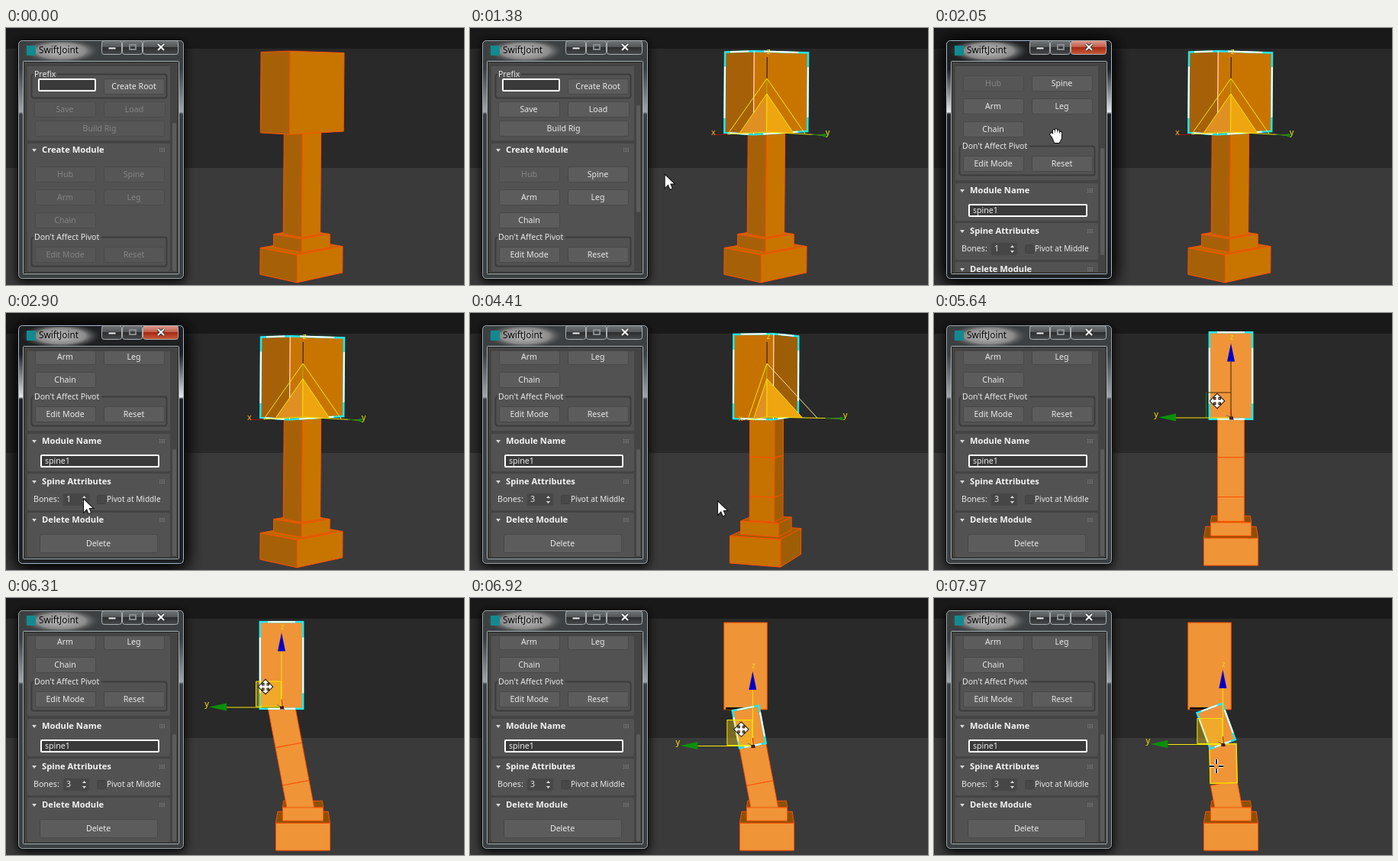
Animation, 600 px wide and 336 px high, one loop 8 s. Source, as an HTML page with a canvas:

```html
<!DOCTYPE html>
<html lang="en">
<head>
<meta charset="utf-8">
<title>Rigging panel</title>
<style>
html, body { margin: 0; width: 600px; height: 336px; overflow: hidden; background: #292929; }
canvas { display: block; }
</style>
</head>
<body>
<canvas id="stage" width="600" height="336"></canvas>
<script>
const c = document.getElementById('stage').getContext('2d');
const LOOP = 8000, FONT = '"Noto Sans", "Open Sans", sans-serif';
const EDGE = '#ff5000', YELLOW = '#f4e800', INK = '#eaeaea';

// ---- timing helpers ----
const smooth = u => u * u * (3 - 2 * u);
const mix = (a, b, u) => a.map((v, i) => v + (b[i] - v) * u);
const rgb = a => `rgb(${a.map(Math.round)})`;

// Rows are [time, ...values]; values hold before the first and after the last row.
function track(rows, t, ease = smooth) {
  if (t <= rows[0][0]) return rows[0].slice(1);
  for (let i = 1; i < rows.length; i++) {
    const [p, q] = [rows[i - 1], rows[i]];
    if (t < q[0]) return mix(p.slice(1), q.slice(1), ease((t - p[0]) / (q[0] - p[0])));
  }
  return rows[rows.length - 1].slice(1);
}
const step = (rows, t) => rows.filter(r => r[0] <= t).pop()[1];

const pointer = [
  [260, 528, 300], [400, 410, 300], [520, 390, 200], [680, 398, 92], [1200, 398, 92],
  [1520, 160, 260], [1990, 160, 141], [2080, 160, 141], [2400, 160, 96], [2540, 160, 96],
  [2840, 102, 244], [3990, 102, 244], [4160, 300, 235], [4410, 325, 247], [4780, 424, 277],
  [4840, 424, 277], [4960, 371, 206], [5160, 371, 206], [5500, 371, 115], [5960, 371, 115],
  [6310, 340, 116], [6560, 341, 118], [6800, 357, 170], [6960, 355, 172], [7650, 361, 172],
  [7850, 361, 172], [7970, 370, 220]];
const pointerKind = [[0, 'none'], [260, 'arrow'], [390, 'cross'], [1300, 'arrow'], [1520, 'hand'],
  [2540, 'arrow'], [4840, 'cross'], [5400, 'move'], [7850, 'cross']];
const scroll = [[1520, 0], [1990, 119], [2080, 119], [2400, 164]];
const orbit = [[4080, 45], [4410, 20], [4780, 0]];
const boxShift = [[5960, 0, 0], [6310, -28, 6], [6440, -29, 8], [6560, -28, 7]];
const jointShift = [[6960, 0, 0], [7650, 8, -2]];

// ---- drawing helpers ----
function path(pts, fill, stroke, width = 1) {
  c.beginPath();
  pts.forEach(p => c.lineTo(p[0], p[1]));
  c.closePath();
  if (fill) { c.fillStyle = fill; c.fill(); }
  if (stroke) { c.strokeStyle = stroke; c.lineWidth = width; c.stroke(); }
}
function line(p, q, color, width = 1) {
  c.strokeStyle = color; c.lineWidth = width;
  c.beginPath(); c.moveTo(p[0], p[1]); c.lineTo(q[0], q[1]); c.stroke();
}
function rect(x, y, w, h, fill, stroke, r = 0, width = 1) {
  c.beginPath(); c.roundRect(x, y, w, h, r);
  if (fill) { c.fillStyle = fill; c.fill(); }
  if (stroke) { c.strokeStyle = stroke; c.lineWidth = width; c.stroke(); }
}
function text(s, x, y, color = INK, size = 10.6, align = 'left', weight = 400) {
  c.font = `${weight} ${size}px ${FONT}`;
  c.textAlign = align; c.textBaseline = 'middle'; c.fillStyle = color;
  c.fillText(s, x, y);
}
function outline(pts) {
  path(pts, null, '#20e8f0', 2.5);
  pts.forEach((p, i) => {
    const q = pts[(i + 1) % pts.length];
    line(mix(p, q, .18), mix(p, q, .82), '#fff', 2);
  });
}

// ---- viewport model ----
const EYE = 70, PIVOT = 66;
let angle = 0;
function project(x, y, z) {
  const s = Math.sin(angle), k = Math.cos(angle), p = 1200 / (1200 - x * k - y * s);
  return [389 + (y * k - x * s) * p - z * .011 * s, EYE + z * p];
}
function shades() {
  const a = angle * 180 / Math.PI, mid = [198, 114, 0];
  return {
    front: rgb(a > 20 ? mix(mid, [166, 97, 8], (a - 20) / 25) : mix([240, 148, 56], mid, a / 20)),
    side: rgb(mix([158, 94, 5], [200, 117, 0], Math.max(0, (a - 20) / 25))),
    top: rgb(mix([140, 80, 0], [186, 108, 0], a / 45))
  };
}
// A block with half sizes hx, hy between heights z0 and z1; returns its silhouette.
function block(hx, hy, z0, z1, shift = [0, 0]) {
  const at = (x, y, z) => { const p = project(x, y, z); return [p[0] + shift[0], p[1] + shift[1]]; };
  const ring = z => [at(hx, -hy, z), at(hx, hy, z), at(-hx, hy, z), at(-hx, -hy, z)];
  const [u, d] = [ring(z0), ring(z1)], color = shades();
  if (z0 > 190) path(u, color.top, EDGE);
  path([u[0], u[1], d[1], d[0]], color.front, EDGE);
  if (u[2][0] <= u[1][0]) return [u[0], u[1], d[1], d[0]];
  path([u[1], u[2], d[2], d[1]], color.side, EDGE);
  return [u[0], u[1], u[2], d[2], d[1], d[0]];
}
function bone(p, q) {
  const len = Math.hypot(q[0] - p[0], q[1] - p[1]);
  const n = [(q[1] - p[1]) / len * 17.6, (p[0] - q[0]) / len * 17.6];
  const quad = [[p[0] - n[0], p[1] - n[1]], [p[0] + n[0], p[1] + n[1]],
                [q[0] + n[0], q[1] + n[1]], [q[0] - n[0], q[1] - n[1]]];
  path(quad, shades().front, EDGE);
  return quad;
}

function scaleGizmo() {
  const axis = (i, r) => project(i == 0 ? r : 0, i == 1 ? r : 0, i == 2 ? PIVOT - r : PIVOT);
  const o = axis(0, 0);
  path([axis(2, 50), axis(0, 49), o], '#e09022');
  path([axis(2, 50), axis(1, 49), o], '#efa510');
  line(axis(2, 50), axis(2, 98), '#14105a');
  line(axis(0, 69), axis(0, 92), '#a01808');
  line(o, axis(0, 69), YELLOW);
  line(o, axis(1, 100), YELLOW);
  line(o, axis(2, 70), YELLOW);
  for (const r of [49, 69]) {
    line(axis(2, r + 1), axis(0, r), YELLOW);
    line(axis(2, r + 1), axis(1, r), angle < .6 && r > 60 ? '#f4e8a0' : YELLOW);
  }
  const x = axis(0, 93), y = axis(1, 101), yl = axis(1, 106);
  line(axis(1, 80), y, '#0a7d10');
  rect(y[0] - 2, y[1] - 2, 4, 4, '#079010');
  text('x', x[0], x[1] - 3, '#ffb020', 11, 'center');
  text('y', yl[0], yl[1] - 4, YELLOW, 11, 'center');
  text('z', 391, 31, YELLOW, 10, 'center');
}
function moveGizmo([x, y], hot) {
  if (hot) rect(x - 33.5, y - 33.5, 33, 33, 'rgba(240,200,20,.4)', YELLOW);
  else {
    line([x - 33, y - 32.5], [x, y - 32.5], '#4a2c00');
    line([x - 32.5, y - 33], [x - 32.5, y], '#138a13');
  }
  line([x, y], [x, y - 73], hot ? YELLOW : '#3a2400');
  line([x, y + .5], [x - 72, y + .5], YELLOW);
  path([[x, y - 97], [x + 5, y - 73], [x - 5, y - 73]], '#0000c8');
  path([[x - 95, y], [x - 72, y - 5], [x - 72, y + 5]], '#0b900b');
  line([x - 6, y - 3], [x + 4, y + 3], '#58666a');
  line([x, y - 10], [x + 1, y], '#c02010');
  rect(x - 2, y - 1, 5, 4, '#501808');
  text('z', x + 1, y - 104, '#e8d820', 10, 'center');
  text('y', x - 98, y - 4, YELLOW, 11, 'center');
}

function viewport(t, cursor) {
  c.fillStyle = '#292929'; c.fillRect(0, 0, 600, 336);
  c.fillStyle = '#191919'; c.fillRect(0, 0, 600, 27);
  c.fillStyle = '#3a3a3a'; c.fillRect(0, 183, 600, 153);

  angle = track(orbit, t, u => u)[0] * Math.PI / 180;
  const bones = step([[0, 1], [3340, 2], [3790, 3]], t);
  const shift = track(boxShift, t), joint = track(jointShift, t);
  const hovering = t > 390 && t < 880;
  const over = part => hovering && step([[0, 'box'], [138, 'post'], [271, 'base']], cursor[1]) == part;
  c.lineJoin = 'miter';

  const base = block(42, 34.3, 216.5, 251);
  block(26, 26, 199.5, 216.5);
  if (over('base')) path(base, null, YELLOW);

  const foot = [389, 291], head = [389 + shift[0], 137 + shift[1]];
  const knee = mix(head, foot, 1 / 3).map((v, i) => v + joint[i]);
  const ankle = mix(head, foot, 2 / 3);
  let top, middle;
  if (t < 5900) {
    for (let i = bones - 1; i >= 0; i--) {
      const z = n => Math.min(199.5, PIVOT + n * 153 / bones);
      const s = block(17.1, 17.1, z(i), z(i + 1));
      if (over('post')) path(s, null, YELLOW);
    }
  } else {
    c.save();
    c.beginPath(); c.rect(0, 0, 600, 273.5); c.clip();
    bone(ankle, foot);
    middle = bone(knee, ankle);
    top = bone(head, knee);
    c.restore();
  }

  const rise = 38 + 5 * (1 - angle / (Math.PI / 4));
  const box = block(50, 27, -rise, PIVOT, shift);
  if (shift[1] > 0) rect(363 + shift[0], 136 + shift[1], 29, shift[1] * .4, '#0a0400');
  if (over('box')) path(box, null, YELLOW);

  if (t >= 880 && t < 6860) {
    outline(box);
    if (box.length > 4) line(box[1], box[4], '#fff');
  }
  if (t >= 6860) {
    path(top, shades().front);
    if (t > 7910) path(middle, null, YELLOW, 1.5);
    outline(top);
  }
  if (t >= 5160) moveGizmo(t < 6860 ? [head[0], head[1] - .5] : knee, t > 5900);
  else if (t >= 880) scaleGizmo();
}

// ---- tool window ----
function button(label, x, y, w, on, h = 20) {
  rect(x + .5, y + .5, w, h, on ? '#5c5c5c' : '#565656', on ? '#484848' : '#4b4b4b', 2);
  text(label, x + w / 2, y + h / 2 + .5, on ? INK : '#858585', 10.6, 'center');
}
function rollout(y, h, title, mid) {
  rect(28, y, 187, h, '#525252', null, 2);
  if (!title) return;
  path([[34, mid - 2], [40, mid - 2], [37, mid + 2]], '#d8d8d8');
  text(title, 47, mid, '#f4f4f4', 11.2, 'left', 700);
  for (let i = 0; i < 12; i++) rect(201 + (i % 4) * 2, mid - 3 + (i >> 2) * 2, 1, 1, '#8a8a8a');
}
function group(label, y, h, w) {
  rect(33.5, y + .5, 177, h, null, '#3c3c3c', 3, 2);
  rect(36, y - 2, w, 5, '#525252');
  text(label, 37, y + 1, INK, 10.5);
}
function field(x, y, w, value) {
  rect(x, y, w, 15, '#3a3a3a', '#fff', 1, 2);
  text(value, x + 5, y + 8);
}
function contents(t) {
  const made = t >= 880;
  rollout(46, 101);
  group('Prefix', 60, 31, 31);
  field(43, 67, 74, '');
  button('Create Root', 128, 66, 79, true);
  button('Save', 37, 96, 80, made);
  button('Load', 128, 96, 80, made);
  button('Build Rig', 38, 121, 169, made);

  rollout(151, 167, 'Create Module', 160);
  button('Hub', 38, 181, 79, false);
  button('Spine', 128, 181, 79, made);
  button('Arm', 38, 211, 79, made);
  button('Leg', 128, 211, 79, made);
  button('Chain', 38, 241, 79, made);
  group("Don't Affect Pivot", 273, 38, 89);
  button('Edit Mode', 38, 286, 79, made);
  button('Reset', 128, 286, 79, made);
  if (!made) return;

  rollout(322, 49, 'Module Name', 332);
  field(46, 350, 154, 'spine1');
  rollout(374, 48, 'Spine Attributes', 385);
  text('Bones:', 36, 408);
  rect(75, 400, 34, 16, '#464646', '#4a4a4a', 2);
  text(step([[0, '1'], [3340, '2'], [3790, '3']], t), 79, 408);
  path([[100, 406], [105, 406], [102.5, 403]], '#e0e0e0');
  path([[100, 410], [105, 410], [102.5, 413]], '#e0e0e0');
  rect(119.5, 402.5, 11, 11, '#484848', '#424242', 1);
  text('Pivot at Middle', 132, 408, INK, 10.1);
  rollout(425, 58, 'Delete Module', 435);
  button('Delete', 44, 453, 154, true, 24);
}
// Vertical gradient; stops are [position, colour].
function shade(y0, y1, ...stops) {
  const g = c.createLinearGradient(0, y0, 0, y1);
  stops.forEach(s => g.addColorStop(...s));
  return g;
}
function titleBar(active) {
  const glow = c.createRadialGradient(0, 0, 8, 0, 0, 52);
  glow.addColorStop(0, '#b4b4b4');
  glow.addColorStop(.55, '#8a8a8a');
  glow.addColorStop(1, 'rgba(60,60,60,0)');
  c.save();
  c.beginPath(); c.rect(18, 18, 214, 25); c.clip();
  c.translate(72, 30); c.scale(1, .32);
  c.fillStyle = glow; c.fillRect(-54, -54, 108, 108);
  c.restore();

  rect(27, 23, 12, 13, '#118a92');
  text('SwiftJoint', 43, 30, '#080808', 11.8);

  for (const [x, w] of [[126, 26], [153, 26], [180, 46]]) {
    const red = active && w > 40;
    rect(x - .5, 16.5, w, 18, red
      ? shade(16, 35, [0, '#dfa093'], [.45, '#c4604c'], [.5, '#a92812'], [1, '#c8603e'])
      : shade(16, 35, [0, '#74787a'], [.45, '#54585a'], [.5, '#2c2e30'], [1, '#484b4d']), '#a8aeb0', 3);
  }
  rect(134, 25, 10, 3, '#f0f0f0', '#333');
  rect(162, 22, 8, 6, null, '#878b8d', 0, 2);
  for (const [color, width] of [['#333', 4], ['#fff', 2]])
    for (const s of [-1, 1]) line([203 - 4 * s, 21], [203 + 4 * s, 29], color, width);
}
function toolWindow(t) {
  const active = t >= 1500 && t < 4080;
  c.save();
  c.shadowColor = '#000'; c.shadowBlur = active ? 24 : 14; c.shadowOffsetY = 3;
  for (let i = 0; i < (active ? 2 : 1); i++) rect(15, 15, 219, 314, '#111', null, 6);
  c.restore();
  const [dark, light] = active ? ['#1e2022', '#e4e6e8'] : ['#3c4042', '#a0a6a8'];
  rect(15.5, 15.5, 218, 313, shade(16, 328, [0, dark], [.12, dark], [.3, light], [.31, dark], [1, dark]),
    '#0a0a0a', 6);
  rect(16.5, 16.5, 216, 311, null, active ? '#a4b6cc' : '#9aa4a8', 5);
  titleBar(active);

  rect(22.5, 43.5, 204, 278, '#444', '#a8b4b8', 1);
  rect(23.5, 44.5, 202, 276, null, '#222');
  const s = track(scroll, t)[0];
  c.save();
  c.beginPath(); c.rect(28, 50, 188, 269); c.clip();
  c.translate(0, -Math.round(s));
  contents(t);
  c.restore();
  const made = t >= 880;
  rect(218, made ? 101 + .47 * s : 124, 5, made ? 140 : 194, '#5c5c5c', null, 2);
}

// ---- pointer ----
const shapes = {
  arrow: new Path2D('M0 0V16L4 12L6.5 18L9 17L6.5 11H11.5Z'),
  hand: new Path2D('M-5 2L-8-2L-6-4L-4-2V-7Q-3-9-2-7L-1-3V-8Q0-10 1-8V-3L2-7Q4-8 4-6V-2L5-5Q7-6 7-4V3L4 9H-2Z'),
  move: new Path2D('M0-9L4-5H1.5V-1.5H5V-4L9 0L5 4V1.5H1.5V5H4L0 9L-4 5H-1.5V1.5H-5V4L-9 0L-5-4V-1.5H-1.5V-5H-4Z'),
  cross: new Path2D('M-9 0H-3M3 0H9M0-9V-3M0 3V9')
};
function drawPointer(t, [x, y]) {
  const kind = step(pointerKind, t), shape = shapes[kind];
  if (!shape) return;
  const cross = kind == 'cross';
  c.save();
  c.translate(x, y);
  c.lineWidth = cross ? 4 : 2;
  c.strokeStyle = cross ? '#fff' : '#111';
  c.stroke(shape);
  if (cross) { c.strokeStyle = '#000'; c.lineWidth = 2; c.stroke(shape); }
  else { c.fillStyle = '#fff'; c.fill(shape); }
  c.restore();
}

function frame() {
  const t = performance.now() % LOOP, cursor = track(pointer, t);
  viewport(t, cursor);
  toolWindow(t);
  drawPointer(t, cursor);
  requestAnimationFrame(frame);
}
frame();
</script>
</body>
</html>
```
